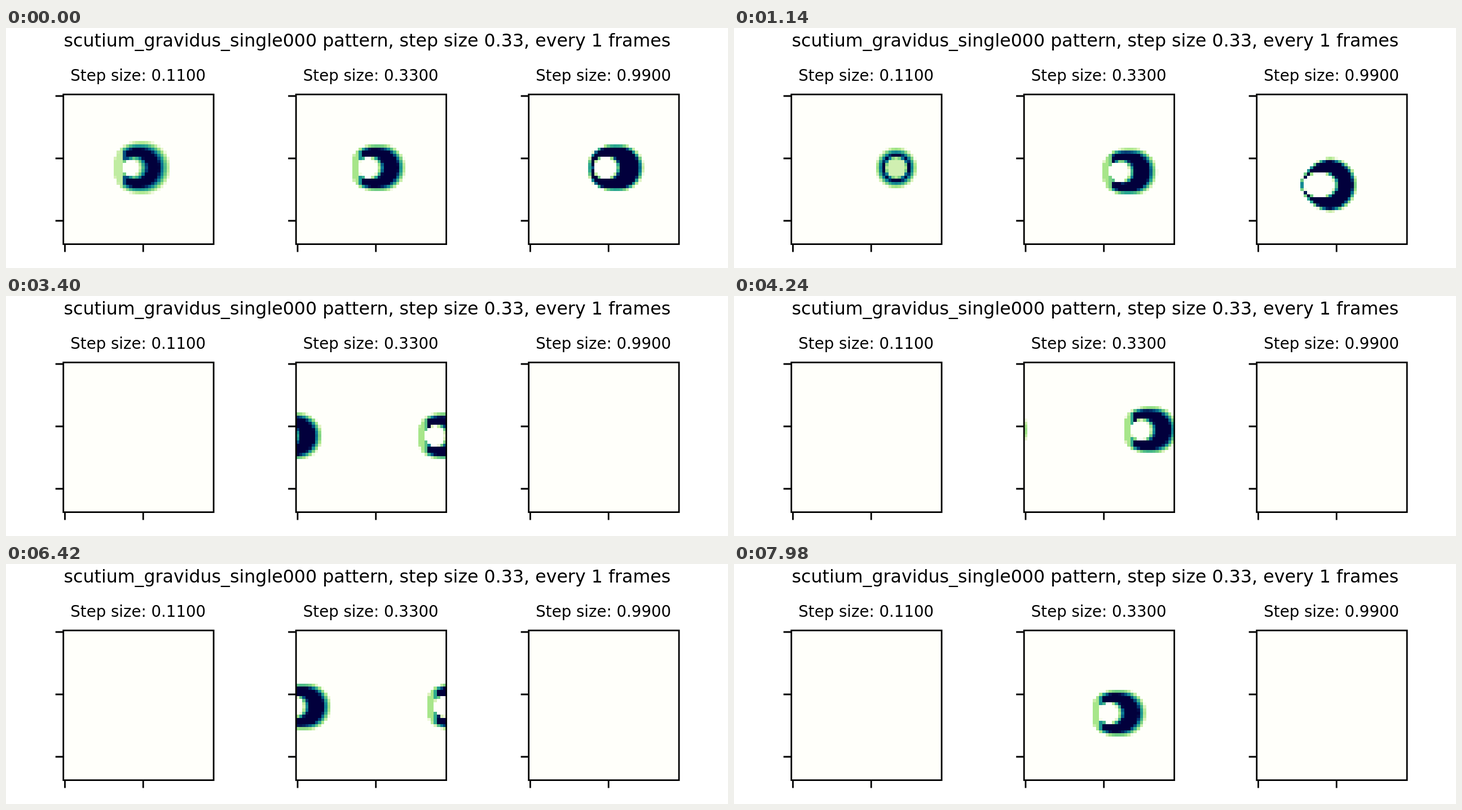
An HTML page with a canvas that plays this animation: 1280x427 px, repeating every 8 s.

```html
<!DOCTYPE html>
<html lang="en">
<head>
<meta charset="utf-8">
<title>Step size comparison</title>
<style>
  html, body { margin: 0; width: 100%; height: 100%; overflow: hidden; background: #fff; }
  canvas, svg { position: absolute; left: 0; top: 0; width: 1280px; height: 427px; }
  text { font-family: "DejaVu Sans", sans-serif; text-anchor: middle; fill: #000; }
</style>
</head>
<body>
<canvas id="cells" width="1280" height="427"></canvas>
<svg id="axes" viewBox="0 0 1280 427">
  <text x="640.4" y="33" font-size="31.67">scutium_gravidus_single000 pattern, step size 0.33, every 1 frames</text>
</svg>
<script>
const STEP_MS = 20, STEPS = 400;
const N = 48, CELL = 5.55, TOP = 118.2, SIDE = N * CELL;

// Evenly spaced colours, from empty to full
const RAMP = ['fffffa', 'dff2c0', 'a5e688', '68c982', '28a690', '0a7a94', '024078', '02003c']
  .map(hex => [0, 2, 4].map(i => parseInt(hex.substr(i, 2), 16)));

const clamp = v => Math.max(0, Math.min(1, v));
const mix = (a, b, t) => a + (b - a) * t;
const wrap = d => ((d + N / 2) % N + N) % N - N / 2;
const ease = (a, b, v) => (1 - Math.cos(Math.PI * clamp((v - a) / (b - a)))) / 2;

// Slows down, closes into a ring and fades
function small(step) {
  const close = ease(20, 57, step), fade = ease(57, 70, step);
  const offset = 4.2 * (1 - close);
  return {
    x: 25.7 + 7.8 * Math.sin(Math.PI / 2 * Math.min(1, step / 60)) - offset, y: 23.5,
    offset, radius: mix(8.7, 6.8, close) * (1 - fade),
    squeeze: mix(0.88, 1, close), power: mix(2.4, 2, close),
    hole: mix(2.5, 2.9, close) * (1 - fade), stretch: 1,
    edge: mix(2.8, 2.6, close), holeEdge: mix(0.8, 1.3, close), frontEdge: 2.2 * (1 - close),
    rear: mix(0.22, 1, close), floor: 0.18 * close
  };
}

// Glides for ever, drifting up and down between turning points
function medium(step) {
  const turns = [[0, 23.5], [110, 25.9], [226, 21.5], [399, 26.5]];
  const y = turns.slice(1).reduce(
    (sum, [end, to], i) => sum + (to - turns[i][1]) * ease(turns[i][0], end, step), turns[0][1]);
  return {
    x: 22.9 + 0.9724 * step, y, offset: 4.55, radius: 7.75, squeeze: 0.78, power: 2.7,
    hole: 3.1, stretch: 1, edge: 1.9, holeEdge: 0.4, frontEdge: 1.7, rear: 0.28, floor: 0
  };
}

// Swells on a curved path, then collapses
function large(step) {
  const swell = ease(0, 57, step), fade = ease(70, 85, step);
  return {
    x: 24.4 + 2.447 * step, y: 23.5 + 5.6 * Math.sin(Math.PI * step / 100),
    offset: mix(4.8, 3.5, swell), radius: mix(7.7, 8.8, swell) * (1 - fade),
    squeeze: mix(0.75, 0.92, swell), power: mix(2.6, 1.7, swell),
    hole: mix(3.3, 3.8, swell), stretch: mix(1.05, 1.25, swell),
    edge: 1.3, holeEdge: 0.5, frontEdge: 0.8, rear: 1, floor: 0
  };
}

const PANELS = [
  { left: 101.7, label: '0.1100', shape: small },
  { left: 514.2, label: '0.3300', shape: medium },
  { left: 926.7, label: '0.9900', shape: large }
];

function colour(v) {
  const pos = v * (RAMP.length - 1), i = Math.min(RAMP.length - 2, Math.floor(pos));
  return `rgb(${RAMP[i].map((c, j) => Math.round(mix(c, RAMP[i + 1][j], pos - i)))})`;
}

// Soft body with an off-centre soft hole
function density(col, row, s) {
  const dx = wrap(col + 0.5 - s.x - s.offset), dy = row + 0.5 - s.y, x = dx + s.offset;
  const behind = dx < 0;
  const p = behind ? s.power : 2;
  const ax = behind ? -dx * s.squeeze : dx;
  const d = (ax ** p + Math.abs(dy) ** p) ** (1 / p);
  if (d >= s.radius) return 0;
  const edge = s.edge * (1 + 0.09 * s.offset * dx / (Math.hypot(dx, dy) || 1));
  const body = (s.radius - d) / edge;
  const h = Math.hypot(x / s.stretch, dy);
  const holeEdge = s.holeEdge + s.frontEdge * Math.max(0, x / (h || 1));
  const hole = s.floor + clamp((h - s.hole) / holeEdge);
  const rear = s.rear + 0.6 * Math.max(0, x + 3);
  return clamp(Math.min(body, hole, rear));
}

const ctx = document.getElementById('cells').getContext('2d');

function drawPanel(left, shape) {
  ctx.fillStyle = colour(0);
  ctx.fillRect(left, TOP, SIDE, SIDE);
  const px = i => Math.round(left + i * CELL), py = i => Math.round(TOP + i * CELL);
  for (let row = 0; row < N; row++) {
    for (let col = 0; col < N; col++) {
      const v = density(col, row, shape);
      if (v < 0.02) continue;
      ctx.fillStyle = colour(v);
      ctx.fillRect(px(col), py(row), px(col + 1) - px(col), py(row + 1) - py(row));
    }
  }
}

function buildAxes() {
  const centre = i => (i + 0.5) * CELL;
  document.getElementById('axes').innerHTML += PANELS.map(({ left, label }) => {
    const yTicks = [0, 20, 40].map(n => `M${left - 14} ${TOP + centre(n)}h14`).join('');
    const xTicks = [0, 25].map(n => `M${left + centre(n)} ${TOP + SIDE}v14`).join('');
    return `<text x="${left + SIDE / 2 - 0.7}" y="94" font-size="27.6">Step size: ${label}</text>
      <rect x="${left}" y="${TOP}" width="${SIDE}" height="${SIDE}" fill="none" stroke="#000" stroke-width="2.8"/>
      <path d="${yTicks}${xTicks}" stroke="#000" stroke-width="2.8"/>`;
  }).join('');
}

let shown = -1;
const start = performance.now();

function render(now) {
  const step = Math.floor(Math.max(0, now - start) / STEP_MS) % STEPS;
  if (step !== shown) {
    shown = step;
    ctx.clearRect(0, 0, 1280, 427);
    PANELS.forEach(({ left, shape }) => drawPanel(left, shape(step)));
  }
  requestAnimationFrame(render);
}

buildAxes();
render(start);
</script>
</body>
</html>
```
